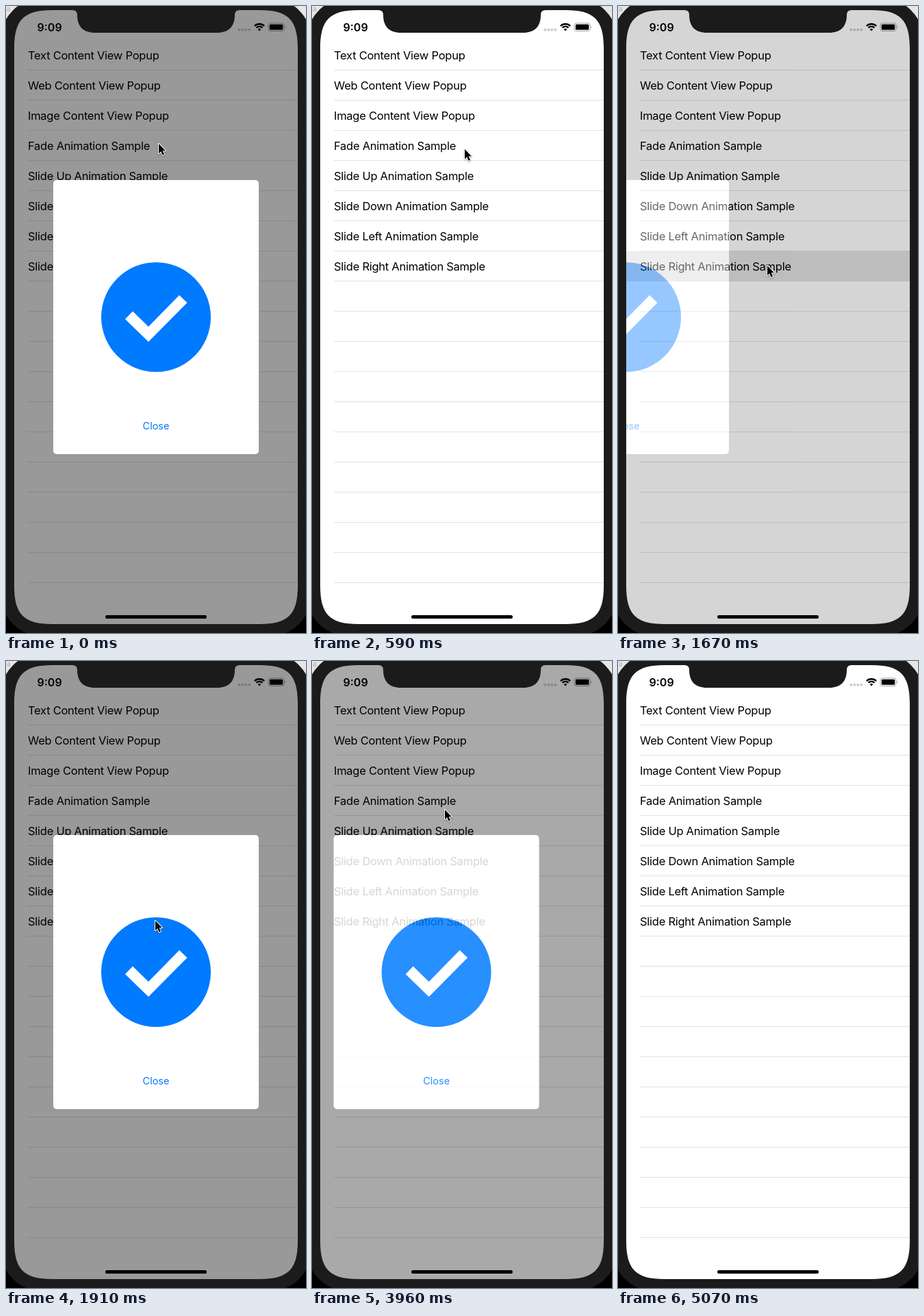
An HTML page for the animation above (5570 ms loop, 438x915 px).

```html
<!DOCTYPE html>
<html lang="en">
<head>
<meta charset="utf-8">
<title>Popup animation</title>
<style>
  html, body { margin: 0; height: 100%; overflow: hidden; background: #000; }
  svg { display: block; width: 100vw; height: 100vh; font-family: Inter, Roboto, sans-serif; }
  .row { font-size: 16.5px; letter-spacing: -.26px; }
  #cursor path { stroke: #fff; stroke-width: 2; paint-order: stroke; stroke-linejoin: round;
    filter: drop-shadow(0 1px 1px rgba(0, 0, 0, .35)); }
</style>
</head>
<body>
<svg viewBox="0 0 438 915">
  <rect width="438" height="450" fill="#e6e6e6"/>
  <text x="1" y="8" font-size="10" fill="#aaa">a</text>

  <rect x="12" y="6" width="414" height="896" fill="#fff"/>
  <rect id="highlight" x="12" y="358" width="414" height="44" fill="#d9d9d9"/>
  <g id="list"></g>

  <g id="status">
    <text x="45.5" y="36.8" font-size="16" font-weight="600">9:09</text>
    <g fill="#cdcdcd">
      <circle cx="340.3" cy="34.8" r="2"/><circle cx="345.3" cy="34.8" r="2"/>
      <circle cx="350.2" cy="34.8" r="2"/><circle cx="355.2" cy="34.8" r="2"/>
    </g>
    <g fill="none" stroke="#000" stroke-width="2.3">
      <path d="M362.9 29.2A10 10 0 0 1 377.1 29.2"/>
      <path d="M365.5 31.8A6.3 6.3 0 0 1 374.5 31.8"/>
    </g>
    <path d="M370 36.5L367.6 34.1A3.4 3.4 0 0 1 372.4 34.1Z"/>
    <rect x="383" y="25" width="23" height="11.5" rx="3" fill="none" stroke="#a4a4a4"/>
    <rect x="384.8" y="26.8" width="19.4" height="7.9" rx="1.5"/>
    <path d="M407.5 28.8Q409.6 30.7 407.5 32.7Z" fill="#a4a4a4"/>
  </g>

  <g id="overlay">
    <rect x="12" y="6" width="414" height="896" fill-opacity=".4"/>
    <g id="popup">
      <rect x="69" y="254" width="300" height="400" rx="5" fill="#fff"/>
      <circle cx="219" cy="454" r="80" fill="#007aff"/>
      <path d="M174 457L185 445.5L208 468L253 422L264.5 433L208 490Z" fill="#fff"/>
      <text x="219" y="617.5" font-size="14.5" text-anchor="middle" fill="#007aff">Close</text>
    </g>
  </g>

  <rect x="145" y="889" width="148" height="5" rx="2.5"/>

  <!-- phone body with the display cut out, then the notch -->
  <path fill="#1b1b1b" fill-rule="evenodd" d="M54-12H384A62 62 0 0 1 446 50V858A62 62 0 0 1 384 920H54A62 62 0 0 1-8 858V50A62 62 0 0 1 54-12Z
    M68 6H370C412 6 426 20 426 62V846C426 888 412 902 370 902H68C26 902 12 888 12 846V62C12 20 26 6 68 6Z"/>
  <path fill="#1b1b1b" d="M97 5V6Q104 6 104 13C104 30 113 39 130 39H308C325 39 334 30 334 13Q334 6 341 6V5Z"/>

  <g id="cursor"><path d="M0 0V14.2L3.2 11.2L5.6 16.8L8 15.8L5.7 10.3H10Z"/></g>
</svg>
<script>
const LOOP = 5570, SLIDE = 235, WIDTH = 414;
const $ = id => document.getElementById(id);
const clamp = v => Math.min(1, Math.max(0, v));

const labels = ['Text Content View Popup', 'Web Content View Popup', 'Image Content View Popup',
  ...['Fade', 'Slide Up', 'Slide Down', 'Slide Left', 'Slide Right'].map(s => s + ' Animation Sample')];

let rows = '';
for (let i = 0; i < 18; i++) {
  const y = 93 + 44 * i;
  if (i !== 7) rows += `<rect x="32" y="${y}" width="394" height="1" fill="#e2e2e3"/>`;
  else rows += `<rect id="rule" x="32" y="${y}" width="394" height="1" fill="#e2e2e3"/>`;
  if (labels[i]) rows += `<text class="row" x="32" y="${y - 15}">${labels[i]}</text>`;
}
$('list').innerHTML = rows;

// The picture refreshes only at these moments.
const ticks = [0, 350, 470, 590, 680, 760, 850, 910, 970, 1020, 1080, 1140,
  1590, 1670, 1790, 1910, 3020, 3110, 3170, 3220, 3280, 3330, 3390,
  3960, 4050, 4160, 4310, 4390, 4470, 4550, 4850, 4900, 4960, 5010, 5070];

// Pointer path: time, x, y
const path = [[0, 223, 201], [350, 223, 201], [590, 223, 209], [680, 223, 240], [850, 221, 354],
  [1140, 218, 379], [3019, 218, 379], [3020, 216, 362], [3390, 194, 217], [4230, 194, 217],
  [4550, 424, 888], [4795, 424, 888], [5070, 413, 918], [LOOP, 413, 918]];

function pointer(t) {
  const i = path.findIndex(k => k[0] > t);
  const [t0, x0, y0] = path[i - 1], [t1, x1, y1] = path[i];
  const p = (t - t0) / (t1 - t0);
  return [x0 + (x1 - x0) * p, y0 + (y1 - y0) * p];
}

// How far the popup is gone (0 to 1) and the side it uses
function popup(t) {
  const since = start => clamp((t - start) / SLIDE);
  if (t < 1574) return [since(312), 1];
  if (t < 3922) return [1 - since(1574), -1];
  return [since(3922), -1];
}

function draw(t) {
  const [gone, side] = popup(t);
  $('overlay').setAttribute('opacity', 1 - gone);
  $('popup').setAttribute('transform', `translate(${side * WIDTH * gone ** 1.32})`);
  const lit = t < 1590 ? 0 : clamp(1 - (t - 1590) / 300);
  $('highlight').setAttribute('opacity', lit);
  $('rule').setAttribute('opacity', 1 - lit);
  $('cursor').setAttribute('transform', `translate(${pointer(t)})`);
}

const begin = performance.now();
function frame() {
  const now = (performance.now() - begin) % LOOP;
  draw(ticks.findLast(k => k <= now));
  requestAnimationFrame(frame);
}
frame();
</script>
</body>
</html>
```
